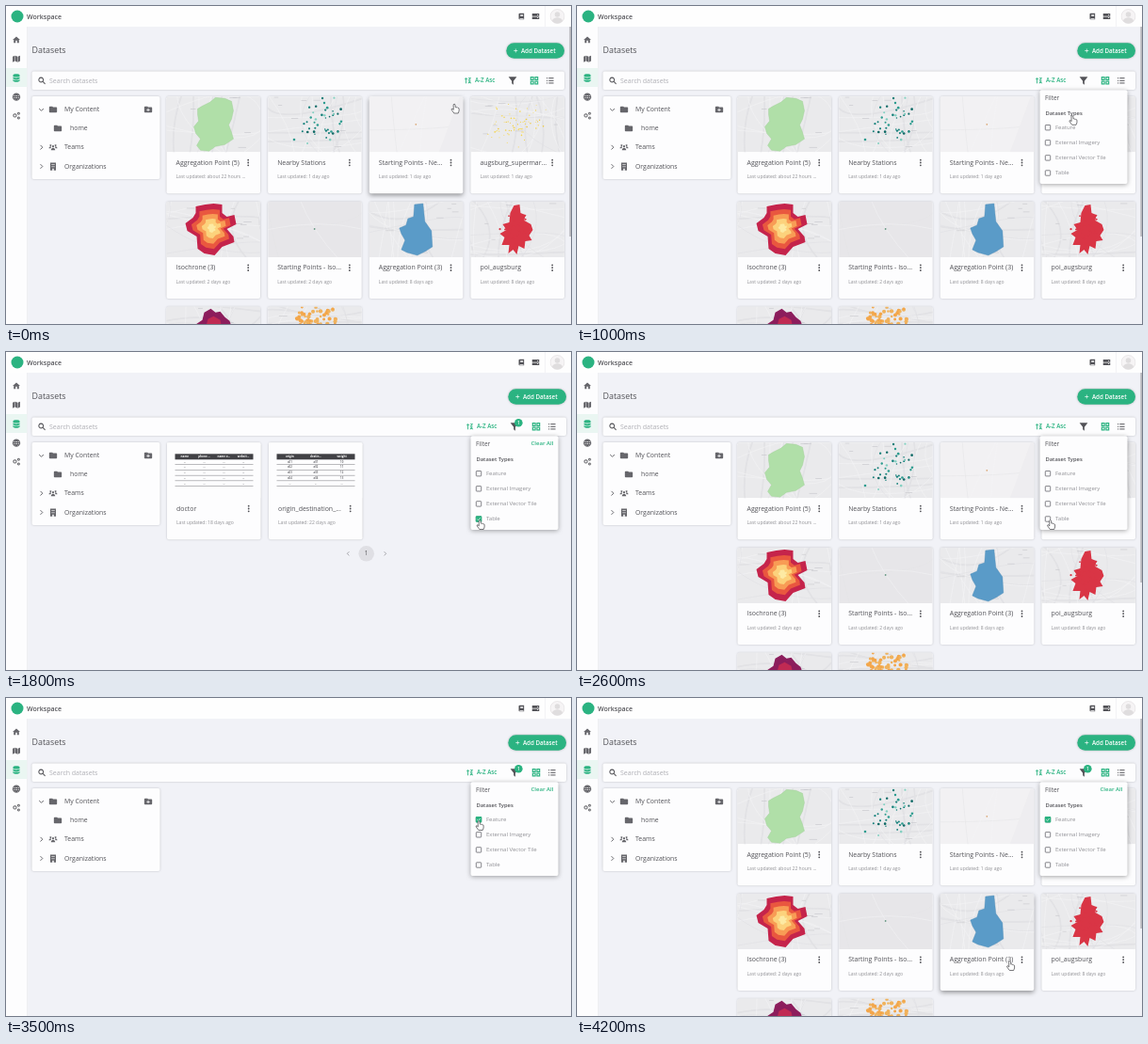
These frames come from a looping animation (600x338 px, 4.3 s). An HTML page:

```html
<!DOCTYPE html>
<html lang="en">
<head>
<meta charset="utf-8">
<title>Datasets workspace</title>
<style>
  html, body { margin: 0; width: 100%; height: 100%; overflow: hidden; background: #f1f2f7; }
  svg { display: block; font-family: "Open Sans", "Noto Sans", sans-serif; }
  .panel { fill: #fdfdfe; filter: drop-shadow(0 .9px 1.1px rgba(0,0,0,.2)); }
  .card.hover .panel { filter: drop-shadow(0 2px 2.5px rgba(0,0,0,.4)); }
  .popup { fill: #fdfdfe; filter: drop-shadow(0 1.5px 2.5px rgba(0,0,0,.35)); }
</style>
</head>
<body>
<svg id="stage" width="600" height="338" viewBox="0 0 600 338"></svg>
<script>
const GREEN = '#2bb381', DARK = '#525257', GRAY = '#8f8f94';
const LOOP = 4300, STEP = 100;

let seed = 11;
const random = () => (seed = seed * 16807 % 2147483647) / 2147483647;
const spread = () => random() + random() + random() - 1.5;
const repeat = (n, fn) => Array.from({ length: n }, (_, i) => fn(i)).join('');

// Drawing helpers; text is placed by its vertical centre.
const text = (x, y, label, size = 7, color = DARK, weight = 500, extra = '') =>
  `<text x="${x}" y="${y + size * .33}" font-size="${size}" fill="${color}" font-weight="${weight}" ${extra}>${label}</text>`;
const rect = (x, y, w, h, fill, rx = 0, extra = '') =>
  `<rect x="${x}" y="${y}" width="${w}" height="${h}" rx="${rx}" fill="${fill}" ${extra}/>`;
const panel = (x, y, w, h) => rect(x, y, w, h, '', 2, 'class="panel"');
const circle = (x, y, r, fill, extra = '') => `<circle cx="${x}" cy="${y}" r="${r}" fill="${fill}" ${extra}/>`;
const polygon = (points, fill, extra = '') => `<polygon points="${points}" fill="${fill}" ${extra}/>`;
const group = (id, body) => `<g id="${id}">${body}</g>`;

// Icons on a 24-unit grid; entries in LINES are stroked.
const FILLED = {
  home: 'M10 20v-6h4v6h5v-8h3L12 3 2 12h3v8z',
  map: 'M2 6l6-3v15l-6 3zM9 3l6 3v15l-6-3zM16 6l6-3v15l-6 3z',
  data: 'M3 5c0-5 18-5 18 0v2c0 4-18 4-18 0zM3 10c3 3 15 3 18 0v3c0 5-18 5-18 0zM3 16c3 3 15 3 18 0v3c0 5-18 5-18 0z',
  folder: 'M10 4H4a2 2 0 0 0-2 2v12a2 2 0 0 0 2 2h16a2 2 0 0 0 2-2V8a2 2 0 0 0-2-2h-8z',
  addFolder: 'M10 4H4a2 2 0 0 0-2 2v12a2 2 0 0 0 2 2h16a2 2 0 0 0 2-2V8a2 2 0 0 0-2-2h-8zM11 9h2v3h3v2h-3v3h-2v-3H8v-2h3z',
  filter: 'M2 3h20l-8 10v9l-4-3v-6z',
  people: 'M12 6a3 3 0 1 1-.1 0zM5 4a2.5 2.5 0 1 1-.1 0zM19 4a2.5 2.5 0 1 1-.1 0zM6 20c0-9 12-9 12 0zM0 15c0-5 5-6 7-4l-2 4zM24 15c0-5-5-6-7-4l2 4z',
  building: 'M4 1h16v22h-6v-5h-4v5H4zM8 5v3h3V5zM13 5v3h3V5zM8 11v3h3v-3zM13 11v3h3v-3z',
  book: 'M6 2h14v20H6a3 3 0 0 1-3-3V5a3 3 0 0 1 3-3zM8 6v2h9V6zM8 10v2h9v-2zM6 18v2h12v-2z',
  server: 'M2 4h20v7H2zM2 13h20v7H2zM16 6.5v2h3v-2zM16 15.5v2h3v-2z',
};
const LINES = {
  globe: 'M12 3a9 9 0 1 0 .1 0zM3 12h18M12 3c-5 5-5 13 0 18c5-5 5-13 0-18M5 7.5h14M5 16.5h14',
  gears: 'M8 7a4 4 0 1 0 .1 0zM18 3a2.5 2.5 0 1 0 .1 0zM18 15a2.5 2.5 0 1 0 .1 0z',
  search: 'M10 4a6 6 0 1 0 .1 0zM15 15l6 6',
  grid: 'M4 4h6v6H4zM14 4h6v6h-6zM4 14h6v6H4zM14 14h6v6h-6z',
  list: 'M8 5h14M8 12h14M8 19h14M2 5h3M2 12h3M2 19h3',
  sort: 'M6 21V4M2 8l4-4 4 4M14 4h7l-7 7h7M14 21l3.5-8 3.5 8M15 18h5',
  down: 'M5 9l7 7 7-7',
  right: 'M9 5l7 7-7 7',
  left: 'M15 5l-7 7 7 7',
  plus: 'M12 4v16M4 12h16',
  check: 'M5 12l5 5 9-10',
};
const icon = (name, x, y, size = 9, color = DARK) =>
  `<path transform="translate(${x - size / 2} ${y - size / 2}) scale(${size / 24})" ` + (FILLED[name]
    ? `d="${FILLED[name]}" fill="${color}" fill-rule="evenodd"/>`
    : `d="${LINES[name]}" fill="none" stroke="${color}" stroke-width="2.6"/>`);

// Map thumbnails, 99.5 x 59 each.
const pick = list => list[Math.floor(random() * list.length)];
const roads = (n, color, width) => repeat(n, () => {
  const y = random() * 80 - 10, x = random() * 120 - 10;
  const d = random() < .5
    ? `M-2 ${y}Q${x} ${y + spread() * 30} 102 ${y + spread() * 30}`
    : `M${x} -2Q${x + spread() * 30} 30 ${x + spread() * 40} 61`;
  return `<path d="${d}" fill="none" stroke="${color}" stroke-width="${width}"/>`;
});
const labels = n => repeat(n, () => rect(random() * 90, random() * 55, 4 + random() * 5, .6, '#c6c6cb'));
const scatter = (n, x, y, w, h, r, colors) => repeat(n, () =>
  circle(x + spread() * w, y + spread() * h, r * (.7 + random() * .6), pick(colors)));
const cityMap = () => roads(5, '#e2e2e5', 1.8) + roads(10, '#f3f3f5', .6) + roads(3, '#dcdce0', .5) + labels(7);
const plainMap = () => roads(2, '#e2e2e5', .5) + roads(2, '#f2f2f4', .5);

const RING = '31,5 41,3 50,2 59,3 59,12 64,16 72,14 74,24 64,29 71,37 72,43 59,48 51,57 40,55 33,50 32,37 22,31 20,23 28,17 31,12';
const rings = [['#c5244b', 1], ['#e9573f', .77], ['#f89c55', .58], ['#fcd27c', .38], ['#fdeaa3', .17]]
  .map(([color, s]) => polygon(RING, color, `transform="translate(${48 * (1 - s)} ${28 * (1 - s)}) scale(${s})"`)).join('');
const thumbs = [
  () => cityMap() + polygon('33,13 38,10 46,6 52,1 62,2 69,5 71,15 69,24 66,30 69,38 71,45 62,51 52,53 45,58 36,57 32,52 36,45 31,39 29,32 34,26 33,19', '#b0dfa8', 'stroke="#9ccb96" stroke-width=".4"'),
  () => cityMap() + scatter(44, 57, 27, 25, 24, 1.05, ['#0f6a66', '#15807a', '#2d9c8f', '#83d0c1']),
  () => plainMap() + polygon('74,59 96,0 99.5,0 99.5,59', '#eeedf0') + circle(49.5, 29.5, .9, '#dba878'),
  () => cityMap() + scatter(75, 49, 30, 27, 19, .65, ['#f4d54e', '#f6dc6c', '#efc93c']),
  () => cityMap() + rings,
  () => plainMap() + circle(49.5, 29, .9, '#6b9a86'),
  () => cityMap() + polygon('48,3 57,2 59,21 66,31 67,48 59,53 51,57 40,54 34,51 38,41 34,34 32,28 39,25 41,18 47,16', '#5a9bc8', 'stroke="#4a88b4" stroke-width=".4"'),
  () => cityMap() + polygon('46,4 52,3 53,12 58,14 57,20 64,24 66,30 62,36 65,41 58,42 57,50 51,47 49,56 45,51 40,55 41,46 33,46 36,38 31,34 38,30 34,24 41,22 42,12', '#d93545') + scatter(40, 49, 29, 15, 17, 1, ['#d93545']),
  () => cityMap() + polygon('30,24 32,18 38,14 40,6 47,2 52,6 57,5 62,11 67,15 70,24', '#8c1d5c') + polygon('41,24 44,13 50,10 57,14 59,24', '#c02a53'),
  () => cityMap() + scatter(65, 50, 14, 20, 14, 1.7, ['#f3a64a', '#f0b25c']),
];

const cardAt = i => ({ x: 170.5 + i % 4 * 107.65, y: 96.3 + Math.floor(i / 4) * 111.7 });
const card = ({ x, y }, title, age, picture, ground = '#eaeaec') => `<g class="card">
  ${panel(x, y, 99.5, 103)}
  <svg x="${x}" y="${y}" width="99.5" height="59">${rect(0, 0, 99.5, 59, ground)}${picture}</svg>
  ${text(x + 10, y + 70.2, title, 6.95)}
  ${repeat(3, k => circle(x + 86.7, y + 67.4 + k * 2.8, .9, DARK))}
  ${text(x + 10, y + 85.3, 'Last updated: ' + age, 5, GRAY)}</g>`;

const datasets = [
  ['Aggregation Point (5)', 'about 22 hours ...'], ['Nearby Stations', '1 day ago'],
  ['Starting Points - Ne...', '1 day ago'], ['augsburg_supermar...', '1 day ago'],
  ['Isochrone (3)', '2 days ago'], ['Starting Points - Iso...', '2 days ago'],
  ['Aggregation Point (3)', '8 days ago'], ['poi_augsburg', '8 days ago'], ['', ''], ['', ''],
];
const grounds = { 2: '#f2f1f3', 5: '#e7e6e9' };

const table = (heads, cell) => {
  const w = 83 / heads.length;
  return rect(8.5, 12, 83, 6, '#414145') +
    heads.map((h, i) => text(8.5 + w * (i + .5), 15, h, 3, '#fff', 700, 'text-anchor="middle"')).join('') +
    repeat(5, r => rect(8.5, 23.2 + r * 5.7, 83, .5, '#77777b') + heads.map((h, i) =>
      text(8.5 + w * (i + .5), 20.5 + r * 5.7, r < 4 ? cell(r, i) : '...', 2.8, DARK, 600, 'text-anchor="middle"')).join(''));
};
const tables =
  card({ x: 171, y: 96.3 }, 'doctor', '18 days ago', table(['name', 'phone ...', 'name o...', 'websit...'], () => '...'), '#fdfdfe') +
  card({ x: 279, y: 96.3 }, 'origin_destination_...', '22 days ago', table(['origin', 'destin...', 'weight'], (r, i) => i < 2 ? 'a0' + (r + 1) : 10 + r), '#fdfdfe') +
  icon('left', 363.5, 214.3, 7, GRAY) + circle(382.7, 214.3, 8.3, '#dfdfe4') +
  text(382.7, 214.3, '1', 6.5, DARK, 500, 'text-anchor="middle"') + icon('right', 402.5, 214.3, 7, GRAY);

const ICON = '#66666b';
const shell =
  rect(0, 0, 600, 22, '#fefefe', 0, 'style="filter:drop-shadow(0 .5px .6px rgba(0,0,0,.12))"') +
  rect(0, 22, 22.5, 316, '#fdfdfe') + rect(22.3, 22, .5, 316, '#e6e6eb') +
  circle(12, 11, 6.5, GREEN) + text(22, 11.3, 'Workspace', 7, DARK, 600) +
  icon('book', 547.5, 11, 8) + icon('server', 562.5, 11, 9) + rect(572, 0, .5, 22, '#e8e8ec') +
  `<svg x="577.5" y="3" width="16" height="16">${circle(8, 8, 7.5, '#f6f4f5', 'stroke="#dedbdc" stroke-width=".6"')}
    ${circle(8, 6, 2.8, '#dfddde')}<path d="M2.5 13C3 8 13 8 13.5 13A7.3 7.3 0 0 1 2.5 13" fill="#dfddde"/></svg>` +
  rect(0, 66, 22.3, 20, '#eaf6f2') +
  ['home', 'map', 'data', 'globe', 'gears'].map((name, i) => icon(name, 11, 36 + i * 20.2, 9.5, i === 2 ? GREEN : ICON)).join('') +
  text(27.5, 47.5, 'Datasets', 8.9) +
  panel(27.5, 96, 136, 88) +
  icon('down', 37.5, 110, 8) + icon('folder', 50, 110, 10, ICON) + text(62, 110, 'My Content', 6.9) + icon('addFolder', 151, 110, 10, ICON) +
  icon('folder', 55, 130, 10, ICON) + text(68, 130, 'home', 6.9) +
  icon('right', 37.5, 150.2, 8) + icon('people', 50, 150.2, 9, ICON) + text(62, 150.2, 'Teams', 6.9) +
  icon('right', 37.5, 170.5, 8) + icon('building', 50, 170.5, 9, ICON) + text(62, 170.5, 'Organizations', 6.9);

const toolbar =
  `<rect id="bar" x="27.5" y="69.5" width="565.5" height="19.5" rx="2" class="panel"/>` +
  icon('search', 38, 79.3, 9.5) + text(46, 79.3, 'Search datasets', 7, '#b0b0b5', 400) +
  group('tools',
    rect(531.3, 39.3, 61.7, 16.4, GREEN, 8.2, 'style="filter:drop-shadow(0 .8px 1px rgba(0,0,0,.25))"') +
    icon('plus', 541.3, 47.5, 6, '#fff') + text(547, 47.5, 'Add Dataset', 6.2, '#fff', 600) +
    icon('sort', 490.5, 79.3, 8, GREEN) + text(498, 79.3, 'A-Z Asc', 6.2, GREEN, 600) +
    circle(538, 79.3, 8.5, '#f5f5f7', 'id="ripple"') +
    icon('filter', 538, 79.3, 10.5) + icon('grid', 561, 79.3, 11, GREEN) + icon('list', 577.8, 79.3, 9) +
    group('badge', circle(542.3, 75.3, 4.3, GREEN) + text(542.3, 75.3, '1', 4.8, '#fff', 600, 'text-anchor="middle"')));

const options = ['Feature', 'External Imagery', 'External Vector Tile', 'Table'];
const menu = group('menu',
  rect(491.5, 89.3, 93, 99.7, '', 2, 'class="popup"') + text(497, 97.5, 'Filter', 6.5) +
  group('clear', text(555.5, 97, 'Clear All', 6, GREEN, 600)) + text(497.5, 113.6, 'Dataset Types', 5.8, DARK, 600) +
  options.map((label, i) => {
    const y = 129.2 + i * 16.1;
    return rect(497.3, y - 2.7, 5.4, 5.4, 'none', .6, 'stroke="#66666c" stroke-width=".8"') +
      group('tick' + i, rect(496.8, y - 3.2, 6.4, 6.4, GREEN, .8) + icon('check', 500, y, 6, '#fff')) +
      text(508, y, label, 6, GRAY);
  }).join(''));

const hand = `<path id="cursor" d="M-1.9 -4.2Q-.9 -5.6 0 -4.2L.3 -1.3Q1 -2 1.7 -1.1Q2.5 -1.6 3 -.6Q4 -.9 4.1 .3V2.5L3.2 5H-1.2L-3.7 1.5Q-4.4 .2 -3 .2L-1.7 1.3Z" fill="#fff" stroke="#404044" stroke-width=".7" stroke-linejoin="round"/>`;

document.getElementById('stage').innerHTML = shell + toolbar +
  group('grid', datasets.map(([title, age], i) => card(cardAt(i), title, age, thumbs[i](), grounds[i])).join('') +
    rect(598.3, 22, 1.7, 223, '#b8b8bc')) +
  group('tables', tables) + menu + hand;

const el = id => document.getElementById(id);
const cards = [...document.querySelectorAll('#grid .card')];
const show = (id, on) => el(id).setAttribute('visibility', on ? 'visible' : 'hidden');
const place = (id, x, y) => el(id).setAttribute('transform', `translate(${x} ${y})`);

// Pointer stops: time, x, y.
const stops = [[0, 477, 109], [400, 542, 81], [700, 542, 81], [1400, 503.5, 183.5], [2700, 503.5, 183.5],
  [3200, 502.5, 135.5], [3700, 502.5, 135.5], [4200, 460.5, 284.5], [LOOP, 460.5, 284.5]];
const pointerAt = t => {
  const i = stops.findIndex((s, k) => k && t <= s[0]);
  const [t0, x0, y0] = stops[i - 1], [t1, x1, y1] = stops[i];
  const u = (t - t0) / (t1 - t0), k = u * u * (3 - 2 * u);
  return [x0 + (x1 - x0) * k, y0 + (y1 - y0) * k];
};

function draw(t) {
  const [x, y] = pointerAt(t);
  const tableOnly = t >= 1700 && t < 2400, featureOnly = t >= 3500;
  // The list is empty, and the scrollbar gone, while a new filter loads.
  const loading = t === 1700 || t === 3500;
  const shift = tableOnly || loading ? 2 : 0;
  const opened = Math.min(1, Math.max(0, (t - 400) / 170));
  const scale = 1 - .18 * (1 - opened) ** 2;
  const overMenu = opened > 0 && x > 491 && y > 89 && y < 189;

  show('grid', !tableOnly && !loading);
  show('tables', tableOnly && !loading);
  for (const id of ['badge', 'clear']) show(id, tableOnly || featureOnly);
  options.forEach((_, i) => show('tick' + i, i === 0 && featureOnly || i === 3 && tableOnly));
  show('ripple', Math.hypot(x - 538, y - 79) < 9);
  el('bar').setAttribute('width', 565.5 + shift);
  place('tools', shift, 0);
  el('menu').setAttribute('opacity', opened);
  el('menu').setAttribute('transform', `translate(${538 + shift} 130) scale(${scale}) translate(-538 -130)`);
  cards.forEach((node, i) => {
    const c = cardAt(i);
    node.classList.toggle('hover', !overMenu && x > c.x && x < c.x + 99.5 && y > c.y && y < c.y + 103);
  });
  place('cursor', x + shift / 4, y);
}

const start = performance.now();
function tick(now) {
  const t = Math.max(0, now - start) % LOOP;
  draw(Math.floor(t / STEP) * STEP);
  requestAnimationFrame(tick);
}
draw(0);
requestAnimationFrame(tick);
</script>
</body>
</html>
```
